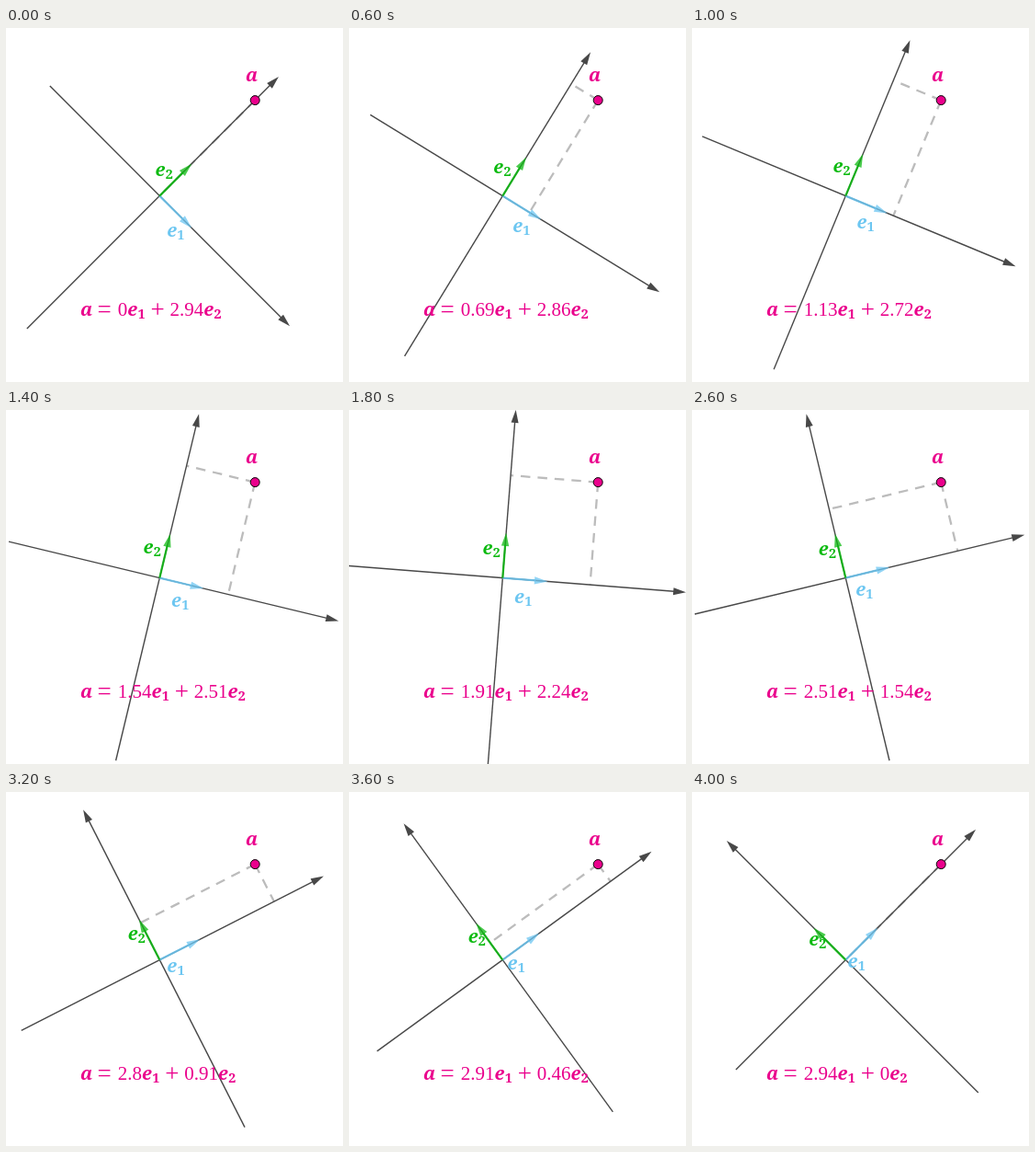
Recreate the animation shown at these times as an HTML page with a canvas. Size 367 px wide and 385 px high, loop 4200 ms.

```html
<!DOCTYPE html>
<html lang="en">
<head>
<meta charset="utf-8">
<title>Vector coordinates in a rotating basis</title>
<style>
  html, body { margin: 0; width: 100%; height: 100%; overflow: hidden; background: #fff; }
  canvas { display: block; }
</style>
</head>
<body>
<canvas id="stage" width="367" height="385"></canvas>
<script>
const ctx = document.getElementById("stage").getContext("2d");
const STEP = 200, STEPS = 21, UNIT = 50;
const O = { x: 167.3, y: 182.6 };
const A = { x: 271.2, y: 78.6 };
const COORD = 2.08;                       // both coordinates of a in the fixed frame
const DARK = "#484848", BLUE = "#6cc6f1", GREEN = "#0cba10", PINK = "#ea008c";
const BOLD = "'Noto Serif', serif", ROMAN = "'Liberation Serif', serif";

const along = (u, d) => ({ x: O.x + u.x * d, y: O.y + u.y * d });

function line(p, q, color, width, dash = []) {
  ctx.strokeStyle = color;
  ctx.lineWidth = width;
  ctx.setLineDash(dash);
  ctx.beginPath();
  ctx.moveTo(p.x, p.y);
  ctx.lineTo(q.x, q.y);
  ctx.stroke();
}

function head(u, tip, color, size, half) {
  const p = along(u, tip), b = along(u, tip - size);
  ctx.fillStyle = color;
  ctx.beginPath();
  ctx.moveTo(p.x, p.y);
  ctx.lineTo(b.x - u.y * half, b.y + u.x * half);
  ctx.lineTo(b.x + u.y * half, b.y - u.x * half);
  ctx.fill();
}

function axis(u, from, to) {
  line(along(u, from), along(u, to - 10), DARK, 1.4);
  head(u, to, DARK, 14, 4);
}

function basis(u, color) {
  ctx.globalAlpha = 0.85;
  line(O, along(u, 36), color, 2.3);
  ctx.globalAlpha = 0.75;
  head(u, 49.3, color, 14.5, 4.2);
  ctx.globalAlpha = 1;
}

// Draws text and returns the x where it ends
function text(s, x, y, font, color) {
  ctx.font = font;
  ctx.fillStyle = color;
  ctx.fillText(s, x, y);
  return x + ctx.measureText(s).width;
}

const letter = (s, x, y, color) => text(s, x, y, "italic bold 20px " + BOLD, color);
const number = (v, x) => text(String(Math.round(v * 100) / 100), x, 313, "21px " + ROMAN, PINK);
const sign = (s, x) => text(s, x, 314.5, "27px " + ROMAN, PINK);

function indexed(n, x, y, color) {
  letter("e", x, y, color);
  text(n, x + 11.2, y + 3, "bold 14.5px " + BOLD, color);
}

function formula(c1, c2) {
  letter("a", 81, 313, PINK);
  sign("=", 99.5);
  let x = number(c1, 121.7);
  indexed("1", x, 313, PINK);
  sign("+", x + 25.4);
  x = number(c2, x + 46.4);
  indexed("2", x, 313, PINK);
}

function draw(step) {
  const angle = (-45 + 4.5 * step) * Math.PI / 180;
  const c = Math.cos(angle), s = Math.sin(angle);
  const u = { x: c, y: -s }, v = { x: -s, y: -c };
  const c1 = COORD * (c + s), c2 = COORD * (c - s);

  ctx.fillStyle = "#fff";
  ctx.fillRect(0, 0, 367, 385);

  for (const foot of [along(u, c1 * UNIT), along(v, c2 * UNIT)])
    line(A, foot, "#bcbcbc", 2.3, [10.5, 8]);
  axis(u, -169, 200.5);
  axis(v, -204.3, 183.3);
  basis(u, BLUE);
  basis(v, GREEN);

  indexed("1", O.x - 13 + 25.5 * c - 4 * s, O.y + 29 - 25.5 * s - 4 * c, BLUE);
  indexed("2", O.x - 19.3 - 25 * s - 4.5 * c, O.y - 0.8 - 25 * c + 4.3 * s, GREEN);
  letter("a", 261, 57.5, PINK);
  formula(c1, c2);

  ctx.beginPath();
  ctx.arc(A.x, A.y, 5, 0, 2 * Math.PI);
  ctx.fillStyle = PINK;
  ctx.fill();
  ctx.setLineDash([]);
  ctx.lineWidth = 1;
  ctx.strokeStyle = "#000";
  ctx.stroke();
}

function tick() {
  draw(Math.floor(performance.now() / STEP) % STEPS);
  requestAnimationFrame(tick);
}
tick();
</script>
</body>
</html>
```
